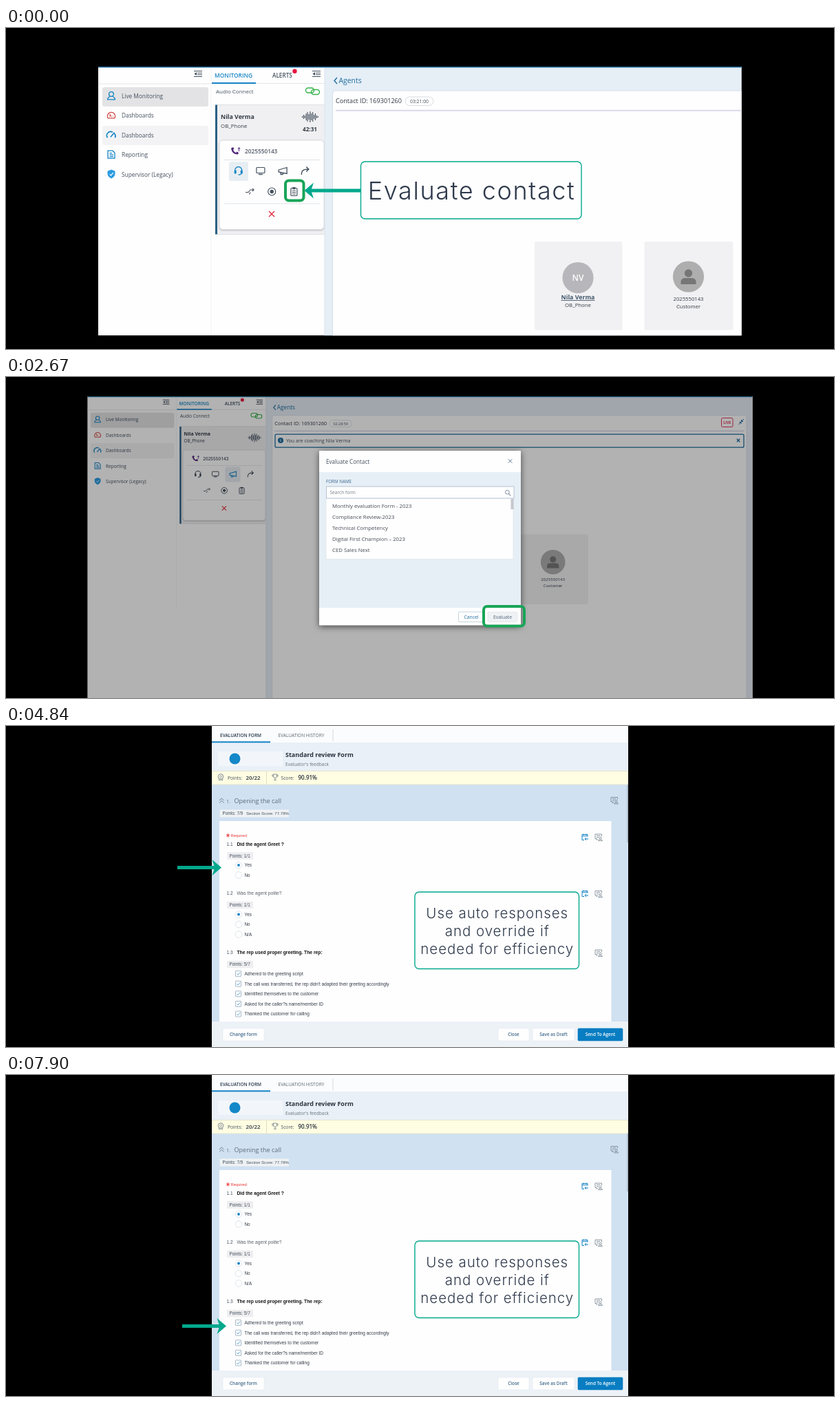
Recreate the animation shown at these times as an HTML page. Size 1203 by 466 pixels, loop 8 s.

```html
<!DOCTYPE html>
<html lang="en">
<head>
<meta charset="utf-8">
<title>Contact evaluation walkthrough</title>
<style>
html, body { margin: 0; height: 100%; overflow: hidden; background: #000; }
svg { display: block; width: 1203px; height: 466px; }
text { font-family: "Open Sans", "Noto Sans", sans-serif; }
.arial { font-family: "Liberation Sans", Arial, sans-serif; }
.call { font-family: Inter, "Open Sans", sans-serif; font-weight: 300; }
.shadow { filter: drop-shadow(0 2px 5px rgba(0,0,0,.6)); }
.soft { filter: drop-shadow(0 1px 1px rgba(60,60,80,.3)); }
</style>
</head>
<body>
<svg id="stage" viewBox="0 0 1203 466"></svg>
<script>
const INK = '#44505e', BLUE = '#1583c5', NAVY = '#1d6d9e', GREEN = '#18a558', TEAL = '#03a88c';
const AGENT = 'Nila Verma', INITIALS = 'NV', PHONE = '2025550143';

const text = (x, y, size, str, fill = INK, attrs = '') =>
  `<text x="${x}" y="${y}" font-size="${size}" fill="${fill}" ${attrs}>${str}</text>`;
const rect = (x, y, w, h, fill, rx = 0, stroke = 'none', sw = 1, attrs = '') =>
  `<rect x="${x}" y="${y}" width="${w}" height="${h}" rx="${rx}" fill="${fill}" stroke="${stroke}" stroke-width="${sw}" ${attrs}/>`;
const path = (d, stroke = INK, sw = 1.1, fill = 'none') =>
  `<path d="${d}" stroke="${stroke}" stroke-width="${sw}" fill="${fill}"/>`;
const circle = (x, y, r, fill, stroke = 'none', sw = 1) =>
  `<circle cx="${x}" cy="${y}" r="${r}" fill="${fill}" stroke="${stroke}" stroke-width="${sw}"/>`;
const at = (x, y, body, more = '') => `<g transform="translate(${x} ${y}) ${more}">${body}</g>`;
const cross = (x, y, r, color, sw) =>
  path(`M${x - r} ${y - r}l${2 * r} ${2 * r}m0 ${-2 * r}l${-2 * r} ${2 * r}`, color, sw);
const MID = 'text-anchor="middle"', BOLD = 'font-weight="700"', SEMI = 'font-weight="600"';
const ARIAL = 'class="arial"';

// Arrow with its tip at x, y; dir 1 points left, -1 points right.
const arrow = (x, y, len, dir) => at(x, y,
  `<path fill="${TEAL}" d="M0 0L13.5-11.5L10.5-2.5H${len}V2.5H10.5L13.5 11.5Z"/>`, `scale(${dir} 1)`);
const frameBox = (x, y, w, h, fill = 'none') => rect(x, y, w, h, fill, 5, GREEN, 4);
const callout = (x, y, w, h, lines, size, gap, first, spacing) =>
  rect(x, y, w, h, '#fefefe', 6, TEAL, 1.4) +
  lines.map((s, i) => text(x + w / 2 + spacing / 2, y + first + i * gap, size, s, '#2e394b',
    `class="call" ${MID} letter-spacing="${spacing}"`)).join('');

const icons = {
  user: c => circle(0, -2.5, 3.4, 'none', c, 1.3) + path('M-2 .5C-3 2-5.5 2-5.5 5.3H5.5C5.5 2 3 2 2 .5', c, 1.3),
  gauge: c => path('M-5 4A5.7 5.7 0 1 1 5 4ZM0 2L-2.5-2M-3 1h1m4 0h1', c, 1.3),
  dial: c => path('M-5.5 4A5.6 5.6 0 0 1 2-4M4.5-2A5.6 5.6 0 0 1 5.5 4M-1 3L4.5-3.5', c, 1.6),
  report: c => path('M-5-5.5H2L5-2.5V5.5H-5ZM-2.5-2H1M-2.5 .5H3M-2.5 3H3', c, 1.3),
  shield: c => path('M0-6L5-4V0C5 3 2 5 0 6C-2 5-5 3-5 0V-4Z', c, 1, c) + path('M-2.3 0L-.5 2L2.7-2', '#fff', 1.2),
  menu: c => path('M-6-4H6M-1-1.3H6M-1 1.3H6M-6 4H6', c, 1.1) + path('M-2-2.5V2.5L-5.5 0Z', 'none', 0, c),
  headset: c => path('M-5 2V-1A5 5 0 0 1 5-1V2C5 5 3 5.5 0 5.5', c, 1.3) + rect(-6, -1, 3, 5, c, 1) + rect(3, -1, 3, 5, c, 1),
  monitor: c => rect(-6, -5, 12, 8, 'none', 1, c, 1.2) + path('M-3 5H3', c, 1.3),
  horn: c => path('M-6-1.5L6-5V4L-6 1.5ZM-3 2V5H0L.5 3', c, 1.3),
  share: c => path('M-5 5.5C-5-1-2-2.5 5-2.5M2-6L5.5-2.5L2 1', c, 1.4),
  route: c => path('M-6 1H-2L1-2.5H6M4-4.5L6-2.5L4-.5M1 1L-.5 4', c, 1.1),
  record: c => circle(0, 0, 5.5, 'none', c, 1.2) + circle(0, 0, 2.7, c),
  clip: c => rect(-4.5, -5, 9, 11, 'none', 1, c, 1.2) + rect(-2, -6.5, 4, 3, c, .5) + path('M-2.5-1.5H2.5M-2.5 1H2.5M-2.5 3.5H2.5', c, 1),
  phone: c => path('M-6-4C-5 2-2 5 4 5L5 2.5L2.5 1L1 2.5C-1 1.5-2.5 0-3-2L-1.5-3L-3-5.5Z', 'none', 0, c) + path('M5.5 .5V-4.5M3.8-3L5.5-5L7.2-3', c, 1),
  person: c => circle(0, -5, 5.7, c) + path('M-11 11V8C-11 3-8 2-4 2H4C8 2 11 3 11 8V11Z', 'none', 0, c),
  note: c => path('M4.5-1.5V-4.5H-5V2H-3V4L-1 2M-3-2.3H2M-3 0H0', c, .8) + circle(2.5, 1, 1.6, 'none', c, .8) + path('M-.5 5C-.5 2.5 5.5 2.5 5.5 5Z', c, .8),
  auto: c => path('M4-1V-4H-4V4H-1M-4-1.8H4M-2-5V-3M2-5V-3M5 2.5H0M2 .5L0 2.5L2 4.5', c, 1)
};
const icon = (name, x, y, color = INK) => at(x, y, icons[name](color));

function app(live) {
  const side = [['user', 'Live Monitoring', BLUE], ['gauge', 'Dashboards', '#d34848'], ['dial', 'Dashboards', BLUE],
    ['report', 'Reporting', BLUE], ['shield', 'Supervisor (Legacy)', '#2a9be0']];
  let wave = '';
  [1, 3, 2, 5, 7, 4, 8, 5, 7, 3, 5, 2, 1].forEach((h, i) => wave += `M${430.5 + i * 1.9} ${129 - h}v${2 * h}`);
  const row = (names, y, x0) => names.map((n, i) =>
    icon(n, x0 + i * 32.2, y, n === (live ? 'horn' : 'headset') ? BLUE : INK)).join('');
  const clip = live ? [134.3, 56, 1224.4, 560] : [134, 56, 934.5, 390.3];
  const bottom = live ? 290.4 : 299.5;

  const body =
    rect(134, 56, 1226, 560, '#fefefe') +
    // navigation
    path('M134 81H298', '#e4e5ea', 1) + icon('menu', 279, 66.5) +
    rect(140, 86, 154, 28, '#e3e3e5', 3) + rect(140, 142, 154, 28, '#f3f3f5', 3) +
    side.map(([n, s, c], i) => icon(n, 153, 98.5 + i * 28.4, c) + text(168, 102 + i * 28.4, 8.3, s)).join('') +
    // contact column
    path('M298 57V446', '#f1f2f5', 1) +
    text(303, 72, 8.4, 'MONITORING', BLUE, SEMI) + text(387, 72, 8.2, 'ALERTS', INK, SEMI) +
    path('M298 80.5H463', '#e4e5ea', 1) + rect(299, 79, 64, 2, BLUE) +
    circle(419.5, 62.7, 3.2, '#e5173f') + icon('menu', 451, 66.5) +
    text(305, 95, 8, 'Audio Connect') +
    rect(435.5, 87, 12, 7, 'none', 3.5, '#35b24a', 1.4) + rect(443.5, 89.5, 12, 7, 'none', 3.5, '#35b24a', 1.4) +
    rect(304, 111.5, 159, bottom - 111.5, '#f0f0f2') + rect(304, 111.5, 3, bottom - 111.5, '#2b5f85') +
    path(`M307 111.5H463M307 ${bottom}H463`, '#dedfe4', 1) +
    at(0, live ? -4.2 : 0, text(312, 132, 8.8, AGENT, '#333b46', BOLD) + text(312, 145, 7.9, 'OB_Phone', '#333b46')) +
    at(0, live ? 3 : 0, path(wave, INK, 1.1)) +
    (live ? '' : text(431, 150, 8.2, '42:31', '#333b46', BOLD)) +
    at(0, live ? -8.2 : 0,
      rect(310, 163, 152, 129.5, '#fefefe', 5, '#d9dbe0', .8, 'class="soft"') +
      icon('phone', 333, 178.5, '#53297e') + text(347, 182, 8.3, PHONE, '#505866', SEMI) +
      path('M317 191.5H456M317 255H456', '#dfe2e8', 1) +
      rect(live ? 388 : 324, 194, 28, 28, '#e7eef3', 3) +
      row(['headset', 'monitor', 'horn', 'share'], 207.5, 337.7) +
      row(['route', 'record', 'clip'], 237.5, 354) + cross(386, 270, 4, '#e22c3c', 1.4)) +
    // agent area
    rect(463, 56, 897, 560, '#e6eef6') + path('M463 57V616', '#dbe3ec', 1) +
    path('M481 72L477 76.5L481 81', NAVY, 1.4) + text(483.5, 80, 10.4, 'Agents', NAVY) +
    rect(474.5, 91, 873.5, 540, '#fefefe', 4, '#d5dde8', 1) +
    text(479, 109.3, 9.15, 'Contact ID: 169301260', '#2e3640') +
    rect(580, 100, 41, 12.5, '#fefefe', 6.2, '#d0d4dc', .8) +
    text(600.5, 108.8, 6.8, live ? '02:28:59' : '03:21:00', INK, MID) +
    rect(479, 118.8, 865, 2, '#dadaea') +
    (live ? '' : rect(768, 310, 127.5, 128.5, '#f1f1f3', 2) + circle(831, 362.5, 22.6, '#b7b7bb') +
      text(831, 367, 12, INITIALS, '#fff', `${MID} ${SEMI}`) +
      text(831, 394, 8.8, AGENT, '#41576b', `${MID} ${BOLD} text-decoration="underline"`) +
      text(831, 405, 7.8, 'OB_Phone', '#333b46', MID)) +
    rect(927.5, 310, 129, 128.5, '#f1f1f3', 2) + circle(991.5, 361, 22.6, '#aeaeae') + icon('person', 991.5, 361, '#767676') +
    text(991.5, 395.7, 7.7, PHONE, '#333b46', MID) + text(991.5, 406.7, 7.7, 'Customer', '#333b46', MID) +
    rect(134, 56, 1226, 1.5, NAVY);

  const [x, y, w, h] = clip;
  return `<clipPath id="view">${rect(x, y, w, h, '#000')}</clipPath>
    <g ${live ? 'transform="translate(12.4 -16.1) scale(.789)"' : ''}><g clip-path="url(#view)">${body}</g></g>`;
}

const banner =
  rect(391, 83.2, 681, 19, '#fefefe', 2, NAVY, 1.3) + circle(399, 92, 4, NAVY) +
  text(399, 94.3, 6, 'i', '#fff', `${MID} ${BOLD}`) +
  text(407, 94.8, 7.05, `You are coaching ${AGENT}`, INK) + cross(1064, 92, 2.2, NAVY, 1.3) +
  rect(1039.5, 59.5, 16.5, 13, '#fefefe', 2, '#e0365c', 1) +
  text(1047.8, 68, 5.2, 'LIVE', '#e0365c', `${MID} ${BOLD}`) +
  path('M1072 61L1068.5 64.5M1068.5 62V64.5H1071M1064.5 69L1068 65.5M1065.5 65.5H1068V68', NAVY, 1);

const forms = ['Monthly evaluation Form - 2023', 'Compliance Review-2023', 'Technical Competency',
  'Digital First Champion – 2023', 'CED Sales Next'];
const formName = i => text(474, 189.6 + i * 16.2, 7.8, forms[i], '#454b55');

const modal =
  rect(455, 107, 293, 253.5, '#fefefe', 1, 'none', 0, 'class="shadow"') +
  rect(455, 138, 293, 197, '#e7eff6') +
  text(465, 126, 8.1, 'Evaluate Contact') + cross(732.5, 122, 2.7, '#5b7189', 1) +
  text(465, 154, 6.25, 'FORM NAME', '#3c6a94') +
  rect(465, 176, 272, 88.5, '#fefefe', 0, '#dfe5ec', .8) +
  rect(465.5, 159, 272.5, 17, '#fefefe', 0, '#b6c4d2', 1) +
  text(470.5, 170, 6.6, 'Search form', '#777f89') +
  circle(728.3, 167.2, 2.9, 'none', '#8490a0', 1) + path('M730.3 169.3L733.3 172.3', '#8490a0', 1.2) +
  rect(733.5, 177, 4, 15, '#c4c7cd') + forms.map((_, i) => formName(i)).join('') +
  rect(657.5, 341, 37.5, 14.5, '#fefefe', 1.5, '#c6d5df', 1) + text(676, 350.5, 6.8, 'Cancel', NAVY, MID) +
  rect(700, 341, 43, 14.5, '#eff2f5', 1.5, '#e3e8ed', .8) + text(721.5, 350.5, 6.9, 'Evaluate', '#566579', MID);

const review = app(true) + banner + rect(118.4, 28, 966, 438, 'rgba(0,0,0,.3)') + modal;

function question(num, title, y, points, isBold) {
  return text(320.5, y + 2.5, 6.5, num, INK, ARIAL) +
    text(335.5, y + 2.5, 6.75, title, isBold ? '#111' : '#59616b', `${ARIAL} ${isBold ? BOLD : ''}`) +
    rect(321, y + 12, 38, 10.5, '#eeeef0') + text(324.5, y + 19.6, 6.4, `Points: ${points}`, INK, ARIAL);
}
const radios = (y, labels) => labels.map((s, i) =>
  circle(338, y + i * 14.5, 4.8, '#fefefe', '#d9dee5', .8) + (i ? '' : circle(338, y, 1.9, BLUE)) +
  text(346.5, y + 2.4 + i * 14.5, 6.4, s, '#333b46', ARIAL)).join('');
const checks = (y, labels) => labels.map((s, i) =>
  at(337.5, y + i * 14.6, rect(-4, -4, 8, 8, '#fefefe', .5, '#93a9ba', .8) + path('M-2.2 0L-.5 1.8L2.5-1.8', '#4c9ccc', .9)) +
  text(346.5, y + 2.3 + i * 14.6, 6.5, s, '#333b46', ARIAL)).join('');
const button = (x, w, s, fill = '#fefefe', color = '#3e678a', edge = '#e1e7ee') =>
  rect(x, 439, w, 18, fill, 1.5, edge, .6) + text(x + w / 2, 450.2, 6.4, s, color, `${MID} ${SEMI}`);

const form =
  rect(299, 0, 605, 466, '#d0e1f1') + rect(299, 0, 605, 24, '#fbfcfd') +
  text(311, 16, 6.5, 'EVALUATION FORM', '#28394a', SEMI) + text(395.5, 16, 6.55, 'EVALUATION HISTORY', '#5d6874') +
  path('M475 5V22', '#d5d9df', 1) + rect(299, 24, 605, 41.5, '#e9f0f7') + rect(299, 22.3, 85, 2, BLUE) +
  rect(308, 37, 94, 21, '#f2f6fa') + circle(332.5, 47.5, 8, '#1488c8') +
  text(406, 45, 9, 'Standard review Form', '#29333e', BOLD) + text(406, 57.5, 6.55, 'Evaluator\'s feedback', '#6a737d') +
  rect(299, 65.5, 605, 19.5, '#fffde2') + path('M299 65.5H904M299 85H904', '#e5e4cc', .8) +
  circle(312, 73.5, 3.8, 'none', '#7f8992', 1) + circle(312, 73.5, 1.5, 'none', '#7f8992', .8) +
  path('M309.5 76.5V79L312 78L314.5 79V76.5', '#7f8992', .8) +
  text(322, 77.7, 6.7, 'Points:') + text(348.5, 77.7, 7.9, '20/22', '#28323d', SEMI) + path('M378.5 66V84', '#dddcc5', 1) +
  path('M388.5 70H393.5V73C393.5 76 388.5 76 388.5 73ZM388.5 71H386.8C386.8 73 387.5 74 388.8 74M393.5 71H395.2C395.2 73 394.5 74 393.2 74M391 75.5V78M389 78.3H393', '#7f8992', .9) +
  text(399.5, 77.7, 6.7, 'Score:') + text(424.5, 77.7, 8.05, '90.91%', '#28323d', SEMI) +
  path('M310 108L313.3 105L316.6 108M310 111.5L313.3 108.5L316.6 111.5', '#687b8e', .9) +
  text(320, 111.5, 7, '1.', '#5d6b79') + text(331.5, 112, 9.05, 'Opening the call', '#5d6b79') +
  rect(310.5, 121.5, 100.5, 11, '#eff2f4') + text(314.5, 129.2, 6.3, 'Points: 7/9', INK, ARIAL) +
  text(349, 129.2, 6.1, 'Section Score: 77.78%', INK, ARIAL) + icon('note', 884, 108, '#71808f') +
  rect(310, 138, 569.5, 291, '#fefefe') +
  path('M322.5 156V161.6M320 157.4L325 160.2M320 160.2L325 157.4', '#ec3434', .9) +
  text(326.5, 161, 5.8, 'Required', '#ec3434', ARIAL) +
  question('1.1', 'Did the agent Greet ?', 171.2, '1/1', true) + radios(202, ['Yes', 'No']) +
  question('1.2', 'Was the agent polite?', 242.6, '1/1', false) + radios(273.5, ['Yes', 'No', 'N/A']) +
  question('1.3', 'The rep used proper greeting. The rep:', 328.7, '5/7', true) +
  checks(359.6, ['Adhered to the greeting script', 'The call was transferred, the rep didn\'t adapted their greeting accordingly',
    'Identified themselves to the customer', 'Asked for the caller?s name/member ID', 'Thanked the customer for calling']) +
  [161.5, 243.5].map(y => icon('auto', 841, y, BLUE)).join('') +
  [161.5, 243.8, 329.5].map(y => icon('note', 861, y, '#71808f')).join('') +
  rect(902, 85, 2, 84, '#b4c0cd') + rect(299, 429, 605, 37, '#edf2f7') +
  button(315, 60, 'Change form') + button(715, 45, 'Close') + button(765, 61, 'Save as Draft') +
  button(831, 65, 'Send To Agent', '#087dc2', '#fff', '#087dc2') +
  callout(594, 241, 238.5, 111.5, ['Use auto responses', 'and override if', 'needed for efficiency'], 20.5, 26, 37.5, .95);

const scenes = [
  [500, app(false) + frameBox(406, 221.5, 26.5, 29) + arrow(433.5, 236, 82, 1) +
    callout(515.5, 194, 320.5, 83, ['Evaluate contact'], 36, 0, 55, 1.6)],
  [2670, review + frameBox(465, 172, 156, 29, '#fefefe') + formName(0) + arrow(623, 186.5, 56, 1) +
    callout(687.5, 145, 320.5, 83, ['Evaluation form'], 36, 0, 55, 2.8)],
  [4840, review + frameBox(694, 333, 59, 28.5)],
  [6340, form + arrow(313, 205.5, 64, -1)],
  [7900, form + arrow(317, 276.5, 64, -1)],
  [8000, form + arrow(320, 364.5, 64, -1)]
];

const stage = document.getElementById('stage');
let shown = -1;
function draw(now) {
  const t = now % 8000;
  const i = scenes.findIndex(([end]) => t < end);
  if (i !== shown) stage.innerHTML = scenes[shown = i][1];
  requestAnimationFrame(draw);
}
draw(performance.now());
</script>
</body>
</html>
```
